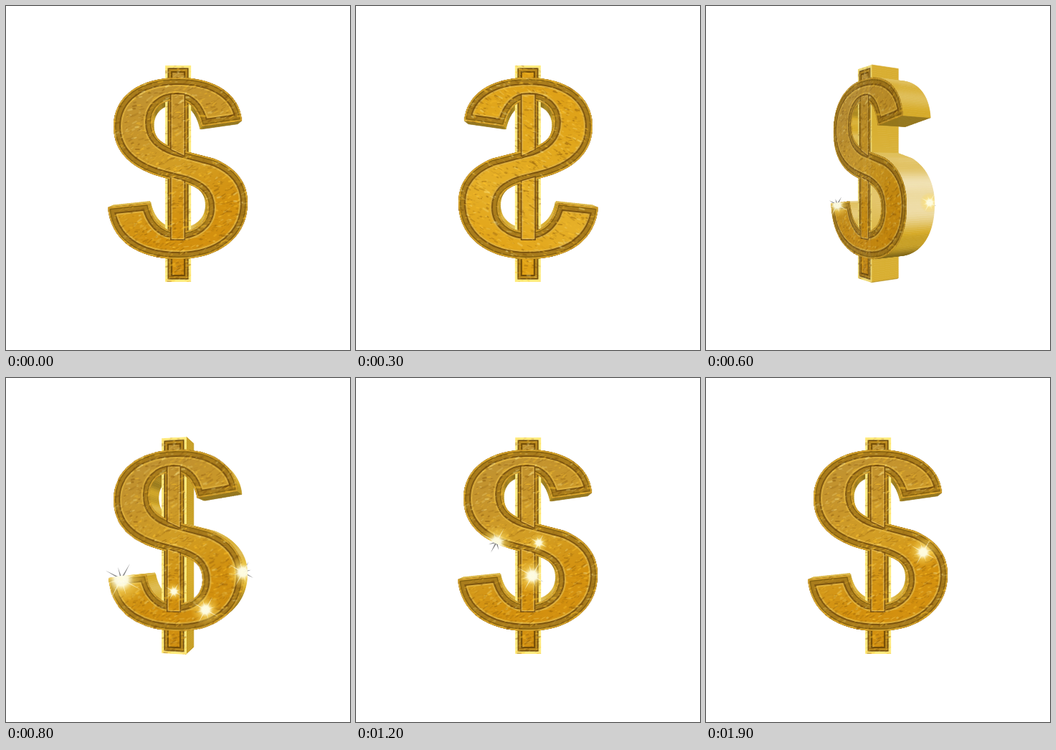
These frames come from a looping animation (480x480 px, 2000 ms). An HTML page with a canvas:

```html
<!DOCTYPE html>
<html lang="en">
<head>
<meta charset="utf-8">
<title>Spinning gold dollar</title>
<style>
  html, body { margin: 0; width: 100%; height: 100%; overflow: hidden; background: #fff; }
  canvas { display: block; width: 100vmin; height: 100vmin; }
</style>
</head>
<body>
<canvas id="stage" width="480" height="480"></canvas>
<script>
const ctx = document.getElementById('stage').getContext('2d');
const CX = 240, CY = 234, DEPTH = 23, FOCAL = 700, EYE = FOCAL + DEPTH;
const HALF_W = 102, HALF_H = 156;
const LOOP = 2000, STEP = 100, HALF_TURN = 300, SPIN_END = 1050;

// The outlines run clockwise, in stage coordinates of the front view.
const BAR = 'M222 83H258V385H222Z';
const LETTER = 'M329 160L273 168C268 146 258 131 238 131C217 131 204 144 204 162' +
  'C204 182 216 192 236 199L290 213C320 225 337 246 337 274C337 322 298 353 240 353' +
  'C182 353 146 326 142 281L199 275C203 298 217 315 241 315C266 315 281 300 281 281' +
  'C281 262 270 254 250 247L222 240C175 228 150 204 150 168C150 126 186 100 240 100' +
  'C293 100 326 124 329 160Z';
// The raised middle of the bar, where it runs into the letter
const RIDGE = 'M229 122H250V211L229 201ZM229 237L250 243V327H229Z';

// x, y, z on the model, first and last moment in ms, size
const SPARKLES = [
  [-78, 48, 23, 500, 1100, 1.3], [91, 38, -20, 500, 1000, .9],
  [45, 88, 23, 600, 1050, .8], [0, 64, 23, 650, 1000, .5],
  [-44, -5, 23, 1000, 1700, 1.1], [6, 42, 23, 950, 1650, 1],
  [15, -4, 23, 1000, 1400, .5], [-11, 118, 23, 1250, 1850, 1.2],
  [63, 9, 23, 1750, 2000, .8]
];

function makeRandom(seed) {
  return () => (seed = (seed * 16807) % 2147483647) / 2147483647;
}

function sampleOutline(d) {
  const path = document.createElementNS('http://www.w3.org/2000/svg', 'path');
  path.setAttribute('d', d);
  const total = path.getTotalLength(), count = Math.round(total / 3);
  return Array.from({ length: count }, (_, i) => {
    const p = path.getPointAtLength(total * i / count);
    return { x: p.x - CX, y: p.y - CY };
  });
}

const walls = [BAR, LETTER].flatMap(d => {
  const points = sampleOutline(d);
  return points.map((a, i) => {
    const b = points[(i + 1) % points.length];
    const len = Math.hypot(b.x - a.x, b.y - a.y) || 1;
    return { a, b, nx: (b.y - a.y) / len, ny: (a.x - b.x) / len };
  });
});

function makeFace(colors, seed) {
  const canvas = document.createElement('canvas');
  canvas.width = 2 * HALF_W;
  canvas.height = 2 * HALF_H;
  const g = canvas.getContext('2d'), random = makeRandom(seed);
  g.translate(HALF_W - CX, HALF_H - CY);
  const gold = g.createLinearGradient(160, 90, 290, 370);
  colors.forEach((c, i) => gold.addColorStop(i / (colors.length - 1), c));

  const bevel = (d, lines) => {
    const path = new Path2D(d);
    g.save();
    g.clip(path);
    g.fillStyle = gold;
    g.fill(path);
    for (const [width, color] of lines) {
      g.lineWidth = width;
      g.strokeStyle = color;
      g.stroke(path);
    }
    g.restore();
  };
  bevel(BAR, [[20, '#704b08'], [16, '#b5851c'], [10, '#65430a'], [7, '#ffe87c']]);
  bevel(LETTER, [[24, '#dcae3c'], [20, '#7b5410'], [16, '#a67a1c'], [7, '#83600f'], [4, '#d3a02c']]);
  bevel(RIDGE, [[6, '#e0b44a'], [3, '#70490c']]);

  // Grain: slanted streaks and blotches, darker and lighter than the metal
  g.globalCompositeOperation = 'source-atop';
  g.lineCap = 'round';
  for (let i = 0; i < 3600; i++) {
    const x = 140 + 200 * random(), y = 82 + 305 * random();
    const tone = random(), length = 1 + 6 * random() ** 2;
    g.strokeStyle = tone < .5 ? `rgba(110,62,0,${.36 * random()})`
      : tone < .8 ? `rgba(255,196,40,${.5 * random()})`
      : `rgba(255,240,150,${.4 * random()})`;
    g.lineWidth = .7 + 2 * random() ** 2;
    g.beginPath();
    g.moveTo(x, y);
    g.lineTo(x + length, y - length * (random() - .1));
    g.stroke();
  }
  return canvas;
}

const front = makeFace(['#b88f35', '#c2922d', '#cf9b24', '#d08f0e', '#ce8e12'], 11);
const back = makeFace(['#d99a16', '#dda41c', '#e2ad28', '#dc9c12'], 29);

function project(x, y, z, angle) {
  const cos = Math.cos(angle), sin = Math.sin(angle);
  const rx = x * cos + z * sin, rz = z * cos - x * sin;
  const scale = FOCAL / (EYE - rz);
  return { x: CX + rx * scale, y: CY + y * scale, rx, rz, scale };
}

function drawWalls(angle) {
  const cos = Math.cos(angle), sin = Math.sin(angle);
  walls
    .map(w => ({ ...w, mid: project((w.a.x + w.b.x) / 2, 0, 0, angle) }))
    .filter(({ a, nx, ny, mid }) =>
      -nx * cos * mid.rx - ny * a.y - nx * sin * (EYE - mid.rz) > 0)
    .sort((p, q) => p.mid.rz - q.mid.rz)
    .forEach(({ a, b, nx, ny, mid }) => {
      const nz = -nx * sin;
      // A reflection glides over the part that bulges towards the viewer.
      const shine = Math.max(nz, 0) * Math.exp(-(((a.y - 30) / 48) ** 2)) * (mid.rz > 35 ? 34 : 16);
      const light = 46 + 9 * nz * Math.abs(nz) - 13 * ny + 4 * Math.sin(9 * Math.atan2(ny, nx)) + shine;
      ctx.fillStyle = ctx.strokeStyle = `hsl(45,68%,${Math.min(light, 88)}%)`;
      ctx.lineWidth = .7;
      ctx.beginPath();
      for (const [p, z] of [[a, DEPTH], [b, DEPTH], [b, -DEPTH], [a, -DEPTH]]) {
        const q = project(p.x, p.y, z, angle);
        ctx.lineTo(q.x, q.y);
      }
      ctx.closePath();
      ctx.fill();
      ctx.stroke();
    });
}

function drawFace(angle) {
  const facing = Math.cos(angle);
  if (Math.abs(facing) * EYE <= DEPTH) return;
  const face = facing > 0 ? front : back;
  const z = facing > 0 ? DEPTH : -DEPTH;
  ctx.filter = `brightness(${.82 + .2 * Math.abs(facing)})`;
  // Every column of a face has one depth, so it only needs a vertical scale.
  for (let i = 0; i < 2 * HALF_W; i++) {
    const p = project(i - HALF_W, 0, z, angle);
    const q = project(i + 1 - HALF_W, 0, z, angle);
    ctx.drawImage(face, i, 0, 1, 2 * HALF_H,
      Math.min(p.x, q.x), CY - HALF_H * p.scale,
      Math.abs(q.x - p.x) + .4, 2 * HALF_H * p.scale);
  }
  ctx.filter = 'none';
}

function drawRays(size, color) {
  ctx.fillStyle = color;
  for (let i = 0; i < 8; i++) {
    const a = .5 + i * Math.PI / 4, r = size * (i % 2 ? 18 : 26);
    ctx.beginPath();
    for (const [angle, radius] of [[a - 1.2, 1.2], [a, r], [a + 1.2, 1.2]])
      ctx.lineTo(Math.cos(angle) * radius, Math.sin(angle) * radius);
    ctx.fill();
  }
}

function drawSparkle(x, y, size) {
  const radius = 27 * size;
  const glow = ctx.createRadialGradient(0, 0, 0, 0, 0, radius);
  glow.addColorStop(0, '#fff');
  glow.addColorStop(.26, 'rgba(255,253,225,.95)');
  glow.addColorStop(.5, 'rgba(255,226,110,.5)');
  glow.addColorStop(1, 'rgba(255,210,60,0)');
  ctx.save();
  ctx.translate(x, y);
  ctx.globalCompositeOperation = 'source-atop';
  ctx.fillStyle = glow;
  ctx.fillRect(-radius, -radius, 2 * radius, 2 * radius);
  drawRays(size, 'rgba(255,252,220,.7)');
  // Where a ray leaves the metal it shows as a grey spike.
  ctx.globalCompositeOperation = 'destination-over';
  drawRays(size * .75, '#858585');
  ctx.restore();
}

// A steady half turn, then a second one that slows to rest
function spinAngle(time) {
  if (time < HALF_TURN) return Math.PI * time / HALF_TURN;
  const left = Math.max(0, (SPIN_END - time) / (SPIN_END - HALF_TURN));
  return Math.PI * (2 - left ** 2.3);
}

function draw(time) {
  const angle = spinAngle(time);
  ctx.clearRect(0, 0, 480, 480);
  drawWalls(angle);
  drawFace(angle);
  for (const [x, y, z, start, end, size] of SPARKLES) {
    if (time <= start || time >= end) continue;
    const p = project(x, y, z, angle);
    drawSparkle(p.x, p.y, size * Math.sin(Math.PI * (time - start) / (end - start)));
  }
}

const begin = performance.now();
let shown = -1;
function tick() {
  const step = Math.floor((performance.now() - begin) % LOOP / STEP);
  if (step !== shown) draw((shown = step) * STEP);
  requestAnimationFrame(tick);
}
tick();
</script>
</body>
</html>
```
